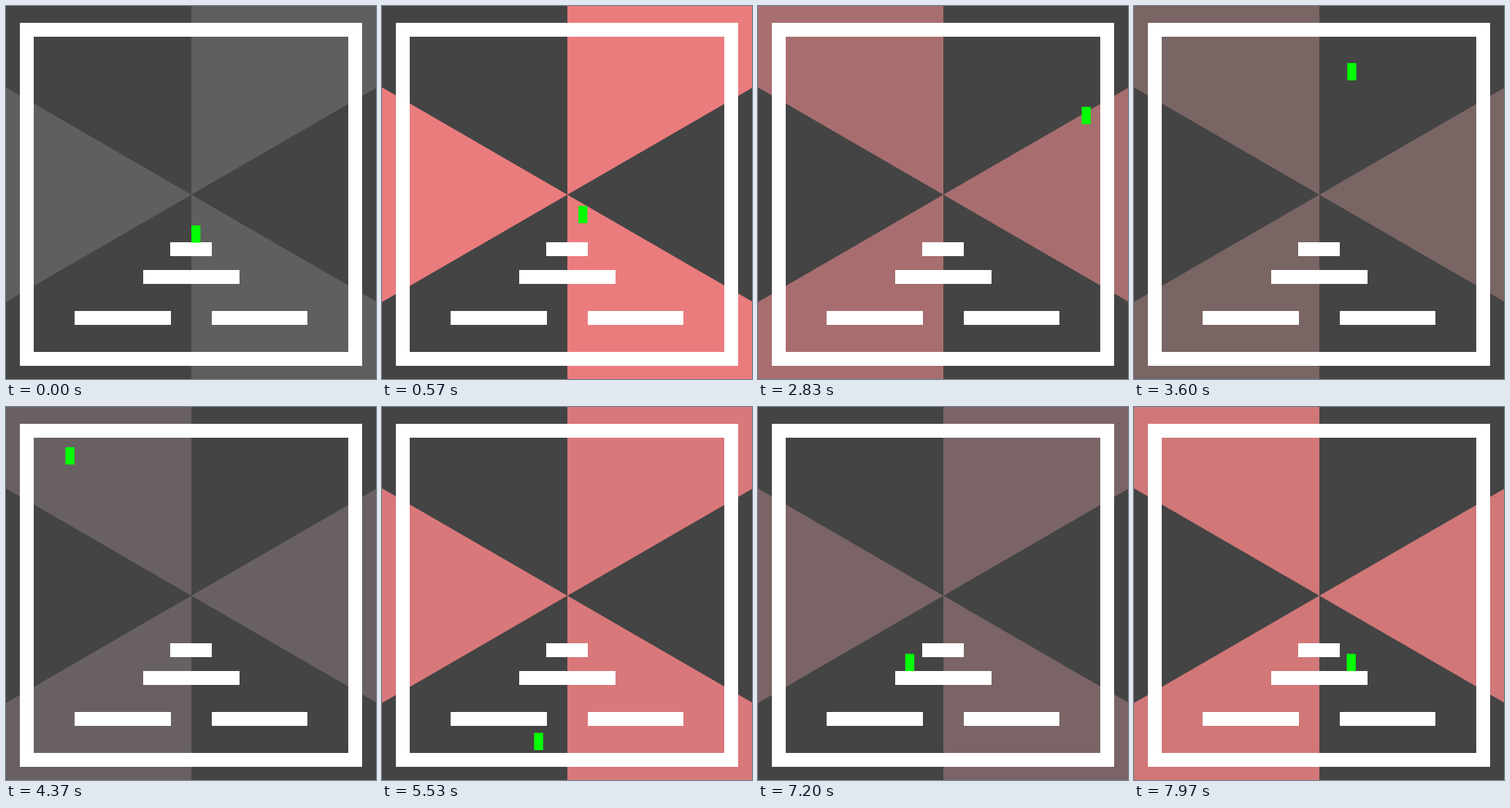
Animation, 507 px wide and 510 px high, one loop 8 s. Source, as an HTML page with a canvas:

```html
<!DOCTYPE html>
<html>
<head>
<meta charset="utf-8">
<style>
html, body { margin: 0; width: 100%; height: 100%; overflow: hidden; background: #444; }
canvas { display: block; }
</style>
</head>
<body>
<canvas id="stage" width="507" height="510"></canvas>
<script>
const ctx = document.getElementById('stage').getContext('2d');
const LOOP = 8000, CELL = 18.75, FADE = 770, GREY = 95, PEAK = [255, 128, 130];
const gridX = c => 19.5 + c * CELL, gridY = r => 23.6 + r * CELL;
const width = 12.4, height = 23.6;

// Player heights when standing on each level, top to bottom
const [top1, top2, top3, floor] = [16, 18, 21, 24].map(r => gridY(r) - height);

// Key points: time, x, y
const path = [
  [0, 254, top1], [270, 254, top1], [330, 259, top1], [470, 259, top1],
  [600, 272, 272], [830, 294, top2], [1365, 294, top2], [1395, 282, top2],
  [1470, 282, top2], [1660, 320, top2], [1860, 358, top3],
  [2100, 401, top3], [2230, 401, top3], [2830, 443.5, 138], [3000, 457, 128],
  [4370, 81.5, 55], [5000, 60, floor], [5340, 165, floor], [5530, 208, 445.5],
  [5600, 232, floor], [5800, 230, 388], [6050, 174, 388], [6400, 172, 359],
  [6700, 184, top2], [6870, 184, top2], [7410, 213, top2], [7540, 254, 290],
  [7667, 294, top2], [7730, 282, top2], [7925, 282, top2],
  [7965, 291.5, top2], [LOOP, 291.5, top2]
];

// Each jump swaps the rays and flashes; the flash fades until landing.
const jumps = [[270, 270], [470, 830], [2230, 6700], [5320, 6700], [7410, 7670]];

function playerAt(t) {
  const i = path.findIndex(k => k[0] > t);
  const [t0, x0, y0] = path[i - 1], [t1, x1, y1] = path[i];
  const u = (t - t0) / (t1 - t0);
  const v = y1 < y0 ? u * (2 - u) : u * u;   // slow while rising, speed up while falling
  return [x0 + (x1 - x0) * u, y0 + (y1 - y0) * v];
}

function drawRays(t) {
  const past = jumps.filter(j => j[0] <= t), count = past.length;
  let glow = 0;
  if (count) {
    const [start, land] = past[count - 1];
    glow = Math.exp((start - Math.min(t, land)) / FADE);
  }
  ctx.fillStyle = '#444';
  ctx.fillRect(0, 0, 507, 510);
  ctx.fillStyle = `rgb(${PEAK.map(p => Math.round(GREY + (p - GREY) * glow))})`;
  const step = Math.PI / 3;
  for (let i = 0; i < 3; i++) {
    const start = -Math.PI / 2 + (2 * i + count % 2) * step;
    ctx.beginPath();
    ctx.moveTo(254, 258);
    ctx.arc(254, 258, 500, start, start + step);
    ctx.fill();
  }
}

function wall(col, row, cols, rows = 1) {
  const x = Math.floor(gridX(col)), y = Math.floor(gridY(row));
  ctx.fillRect(x, y, Math.round(gridX(col + cols)) - x, Math.round(gridY(row + rows)) - y);
}

function drawWalls() {
  ctx.fillStyle = '#fff';
  for (const edge of [0, 24]) {
    wall(0, edge, 25);
    wall(edge, 0, 1, 25);
  }
  wall(11, 16, 3);
  wall(9, 18, 7);
  wall(4, 21, 7);
  wall(14, 21, 7);
}

function draw(t) {
  drawRays(t);
  drawWalls();
  const [x, y] = playerAt(t);
  ctx.fillStyle = '#0f0';
  ctx.fillRect(x, y, width, height);
}

function tick() {
  draw(performance.now() % LOOP);
  requestAnimationFrame(tick);
}
tick();
</script>
</body>
</html>
```
